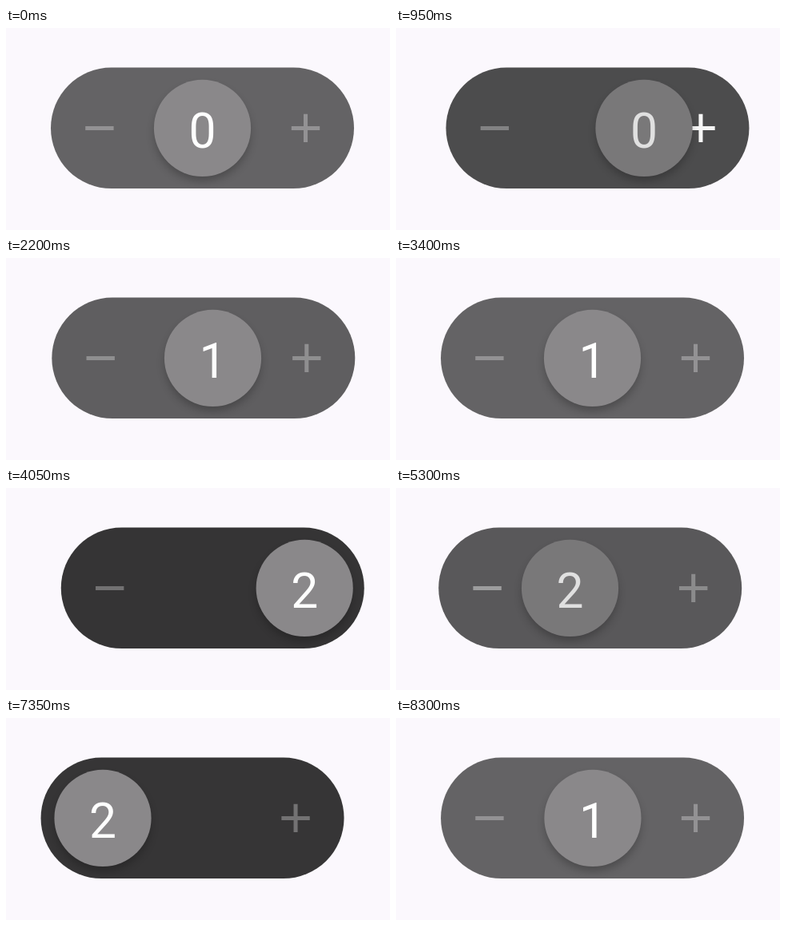
An HTML page that plays this animation: 480x253 px, repeating every 8.35 s.

```html
<!DOCTYPE html>
<html lang="en">
<head>
<meta charset="utf-8">
<title>Counter button</title>
<style>
  html, body { margin: 0; width: 100%; height: 100%; overflow: hidden; background: #fbf8fd; }
  svg { display: block; width: 100%; height: 100%; }
  text { font: 400 60.6px Roboto, sans-serif; text-anchor: middle; fill: #fff; }
  .icon { stroke: #fff; stroke-width: 5.05; fill: none; }
</style>
</head>
<body>
<svg viewBox="0 0 480 253">
  <defs>
    <filter id="soft" x="-30%" y="-30%" width="160%" height="160%">
      <feGaussianBlur stdDeviation="6"/>
    </filter>
  </defs>
  <g id="container">
    <rect id="pill" x="56" y="49.5" width="379" height="151.6" rx="75.8"/>
    <path id="minus" class="icon" d="M99.2 125.4h35.4"/>
    <path id="plus" class="icon" d="M356.8 125.4h35.4M374.5 107.7v35.4"/>
  </g>
  <g id="thumb">
    <circle cx="245.5" cy="132" r="59" opacity=".27" filter="url(#soft)"/>
    <circle cx="245.5" cy="125.4" r="60.6" fill="#8a888a"/>
    <text id="digit" x="245.5" y="149.6">0</text>
    <circle id="press" cx="245.5" cy="125.4" r="60.6"/>
  </g>
</svg>
<script>
const LOOP = 8350, STEP = 50;
const DRAG_LIMIT = 136, HIGHLIGHT_LIMIT = 68, ICON_ALPHA = 0.3;

// Each gesture: finger path as [ms, px], finger lift, spring release, value afterwards.
const gestures = [
  { path: [[200, 0], [600, 20], [950, 64.5], [1000, 74], [1400, 112], [1800, 128]],
    lift: 1900, release: 2050, value: 1 },
  { path: [[3400, 0], [3650, 48], [3850, 112], [3950, 128]],
    lift: 3900, release: 4045, value: 2 },
  { path: [[5100, 0], [5300, -28], [5900, -50], [6750, -89], [7200, -124.5]],
    lift: 7350, release: 7480, value: 1 }
];

const el = id => document.getElementById(id);
const clamp = (v, lo, hi) => Math.min(hi, Math.max(lo, v));

function along(path, t) {
  let [t0, x0] = path[0];
  for (const [t1, x1] of path) {
    if (t < t1) return x0 + (x1 - x0) * clamp((t - t0) / (t1 - t0), 0, 1);
    [t0, x0] = [t1, x1];
  }
  return x0;
}

// Underdamped spring from 1 to 0: damping ratio 0.5, stiffness 200.
function spring(seconds) {
  const omega = Math.sqrt(200), zeta = 0.5, root = Math.sqrt(1 - zeta * zeta);
  const phase = omega * root * seconds;
  return Math.exp(-zeta * omega * seconds) * (Math.cos(phase) + zeta / root * Math.sin(phase));
}

function stateAt(t) {
  const state = { offset: 0, value: 0, press: 0 };
  for (const { path, lift, release, value } of gestures) {
    const start = path[0][0];
    if (t < start) break;
    state.press = clamp((t - start) / 150, 0, 1) * clamp((lift - t) / 50, 0, 1);
    state.offset = along(path, t);
    if (t >= release) {
      state.offset *= t - release > 850 ? 0 : spring((t - release) / 1000);
      state.value = value;
    }
  }
  return state;
}

function draw(now) {
  const t = Math.floor((now % LOOP) / STEP) * STEP;
  const { offset, value, press } = stateAt(t);
  const iconAlpha = drag => clamp(drag / HIGHLIGHT_LIMIT, ICON_ALPHA, 1);
  el('container').setAttribute('transform', `translate(${offset * 0.1})`);
  el('thumb').setAttribute('transform', `translate(${offset})`);
  el('pill').setAttribute('opacity', 0.6 + 0.2 * Math.abs(offset) / DRAG_LIMIT);
  el('minus').setAttribute('opacity', iconAlpha(-offset));
  el('plus').setAttribute('opacity', iconAlpha(offset));
  el('press').setAttribute('opacity', 0.12 * press);
  el('digit').textContent = value;
}

const origin = performance.now();
function frame() {
  draw(performance.now() - origin);
  requestAnimationFrame(frame);
}
frame();
</script>
</body>
</html>
```
